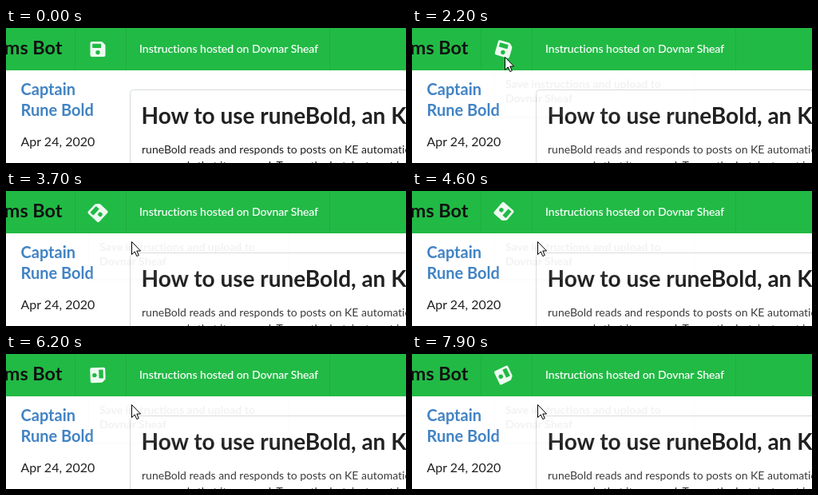
Animation, 501 px wide and 169 px high, one loop 8 s. Source, as an HTML page:

```html
<!DOCTYPE html>
<html lang="en">
<head>
<meta charset="utf-8">
<title>Save instructions</title>
<style>
  html, body { margin: 0; width: 100%; height: 100%; overflow: hidden; background: #fff; }
  svg {
    display: block; width: 501px; height: 169px;
    font: 14px Lato, sans-serif; font-variant-ligatures: none; fill: #212121;
  }
  .bold { font-weight: 700; }
  .title { font-size: 23.4px; fill: #111; }
  .note { fill: #fff; stroke: #fff; stroke-width: .2; }
  .link { font-size: 20px; fill: #4183c4; }
  .popup-box { filter: drop-shadow(0 2px 2px rgba(34, 36, 38, .12)) drop-shadow(0 2px 5px rgba(34, 36, 38, .15)); }
</style>
</head>
<body>
<svg viewBox="0 0 501 169" xmlns="http://www.w3.org/2000/svg">
  <defs>
    <clipPath id="belowNav"><rect y="53" width="501" height="116"/></clipPath>
  </defs>
  <rect width="501" height="169" fill="#fff"/>

  <g id="nav">
    <rect width="501" height="53" fill="#21ba45"/>
    <path d="M86.5 0V53M150.5 0V53M405.5 0V53" stroke="#222426" stroke-opacity=".08"/>
    <text class="bold title" x="70.5" y="33" text-anchor="end">ms Bot</text>
    <text class="note" x="167" y="31">Instructions hosted on Dovnar Sheaf</text>
    <path id="disk" fill="#fff" fill-opacity=".92" fill-rule="evenodd" d="
      M-7.5 -9.5H3.9Q5.2 -9.5 6 -8.7L8.8 -5.9Q9.5 -5.2 9.5 -4V7.5Q9.5 9.5 7.5 9.5H-7.5Q-9.5 9.5 -9.5 7.5V-7.5Q-9.5 -9.5 -7.5 -9.5Z
      M-6.3 -6.8H3.6L4.1 -6.3V-1.9Q4.1 -1.4 3.6 -1.4H-6.3Q-6.8 -1.4 -6.8 -1.9V-6.3Q-6.8 -6.8 -6.3 -6.8Z
      M-2.7 4.1a2.7 2.7 0 1 0 5.4 0a2.7 2.7 0 1 0 -5.4 0Z"/>
  </g>

  <g id="side">
    <text class="bold link" x="18.5" y="84">Captain</text>
    <text class="bold link" x="18.5" y="110">Rune Bold</text>
    <text x="18.5" y="148" font-size="16">Apr 24, 2020</text>
  </g>

  <g id="card">
    <rect x="155.5" y="77.5" width="400" height="130" rx="4" fill="#fff" stroke="#d6dbde"/>
    <text class="bold" x="169.5" y="120" font-size="28">How to use runeBold, an KE forum bot</text>
    <g id="copy">
      <text x="170" y="157">runeBold reads and responds to posts on KE automatically to</text>
      <text x="170" y="177">commands that it can read. To use the bot, just post in</text>
    </g>
  </g>

  <g id="popup">
    <path class="popup-box" fill="#fff" stroke="#d4d4d5" d="
      M107.5 49.5H115.5L122 43L128.5 49.5H349.5Q353.5 49.5 353.5 53.5V106.5Q353.5 110.5 349.5 110.5H107.5Q103.5 110.5 103.5 106.5V53.5Q103.5 49.5 107.5 49.5Z"/>
    <text class="bold" x="117" y="75">Save instructions and upload to</text>
    <text class="bold" x="117" y="93">Dovnar Sheaf</text>
  </g>

  <path id="cursor" fill="#fff" stroke="#000"
    d="M.5 .5V16.5L4.3 12.9L6.8 18.6L9.3 17.5L6.8 12H11.6Z"/>
</svg>

<script>
  const LOOP = 8000, STEP = 100;
  const HOVER = 1800, CLICK = 2200;
  const START_ANGLE = 16, STEP_ANGLE = 19.8;

  // Pointer stops: time, x, y. Each one holds until the next.
  const stops = [
    [300, 477, 57], [400, 446, 63], [500, 377, 69], [600, 295, 56],
    [1000, 236, 59], [1100, 194, 57], [1200, 162, 54], [1300, 142, 51],
    [1400, 127, 47], [1500, 110, 39], [1600, 116, 36]
  ];
  // After the click the pointer glides away by x, y.
  const glide = { from: 2700, to: 3100, x: 41, y: 27 };

  const [disk, copy, popup, cursor] =
    ['disk', 'copy', 'popup', 'cursor'].map(id => document.getElementById(id));
  const clamp = v => Math.max(0, Math.min(1, v));

  function pointerAt(t) {
    const stop = stops.filter(s => s[0] <= t).pop();
    if (!stop) return null;
    const p = clamp((t - glide.from) / (glide.to - glide.from));
    const ease = p * p * (3 - 2 * p);
    return [stop[1] + glide.x * ease, stop[2] + glide.y * ease].map(Math.round);
  }

  function draw(t) {
    const clicked = t >= CLICK;
    const angle = clicked ? START_ANGLE + (t - CLICK) / STEP * STEP_ANGLE : 0;
    disk.setAttribute('transform', `translate(115 26.5) rotate(${angle})`);
    copy.setAttribute('opacity', clicked ? .88 : 1);

    // After the click only a faint trace of the popup stays on the page.
    popup.setAttribute('opacity', t < HOVER ? 0 : clicked ? .05 : 1);
    popup.setAttribute('clip-path', clicked ? 'url(#belowNav)' : 'none');

    const at = pointerAt(t);
    cursor.setAttribute('visibility', at ? 'visible' : 'hidden');
    if (at) cursor.setAttribute('transform', `translate(${at})`);
  }

  const start = performance.now();
  function tick() {
    const t = (performance.now() - start) % LOOP;
    draw(Math.floor(t / STEP) * STEP);
    requestAnimationFrame(tick);
  }
  tick();
</script>
</body>
</html>
```
